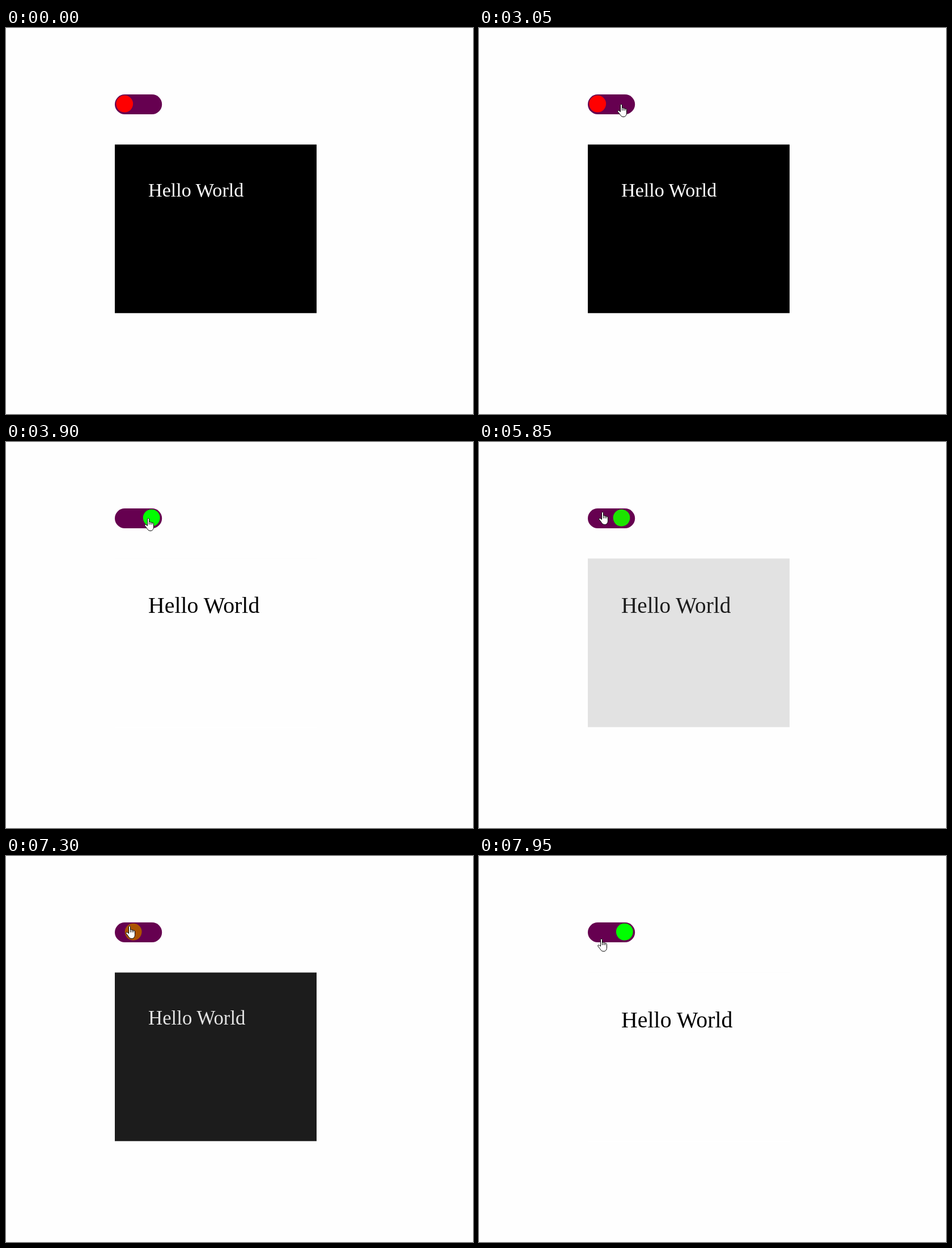
An HTML page that plays this animation: 824x680 px, repeating every 8000 ms.

```html
<!DOCTYPE html>
<html lang="en">
<head>
<meta charset="utf-8">
<title>Toggle switch</title>
<style>
  html, body { margin: 0; width: 100%; height: 100%; overflow: hidden; background: #fefefe; }
  svg { display: block; }
  text { font-family: "Liberation Serif", "Times New Roman", serif; }
  .cursor { fill: #fff; stroke: #000; stroke-linejoin: round; }
</style>
</head>
<body>
<svg width="824" height="680" viewBox="0 0 824 680">
  <rect x="192" y="117" width="83.2" height="35" rx="17.5" fill="#660050"/>
  <circle id="knob" cy="133.6" r="14.9"/>
  <rect id="panel" x="192" y="205.3" width="356" height="297"/>
  <text id="label" x="251">Hello World</text>
  <path id="arrow" class="cursor" d="M.5 .5V17L4.3 13.4L6.8 18.7L9.2 17.6L6.9 12.3H12Z"/>
  <path id="hand" class="cursor" d="M5.5 13.5V2C5.5 0 8.5 0 8.5 2V7.5C8.5 6 11.3 6 11.3 8C11.3 6.8 13.9 7 13.9 8.8C13.9 7.6 16.5 8 16.5 10V15.5C16.5 20 14 22.5 11 22.5C7.5 22.5 6 20.5 4.5 18L1 13.5C0 11.8 2 10.6 3.3 11.8ZM8.5 7.5V11.5M11.3 8V11.5M13.9 9V11.5"/>
</svg>
<script>
const LOOP = 8000, STEP = 50, DURATION = 300, WHITE = 254;
const [knob, panel, label, arrow, hand] =
  ['knob', 'panel', 'label', 'arrow', 'hand'].map(id => document.getElementById(id));

// Each click flips the switch; the knob may run ahead of the panel.
const clicks = [
  { panelAt: 3617, knobAt: 3617, knobTime: DURATION },
  { panelAt: 5817, knobAt: 5817, knobTime: DURATION },
  { panelAt: 7267, knobAt: 7250, knobTime: 235 },
];

// Pointer hot spot: time, x, y
const track = [
  [300, 46, -24], [350, 58, -8], [700, 290, 92], [900, 379, 205], [1100, 360, 277.5],
  [1150, 360, 277.5], [1250, 356, 308.5], [1600, 356, 308.5], [1800, 448, 390],
  [2000, 330, 447], [2200, 133, 350], [2320, 180, 250], [2450, 280, 210],
  [3050, 250, 134], [4750, 250, 134], [5100, 217, 123], [7800, 217, 123], [7950, 215, 145.5],
];

const mix = (a, b, p) => a + (b - a) * p;
const clamp = v => Math.min(1, Math.max(0, v));

// CSS "ease": cubic-bezier(.25, .1, .25, 1)
function ease(x) {
  if (x <= 0 || x >= 1) return clamp(x);
  const bezier = (a, b, s) => 3 * a * s * (1 - s) ** 2 + 3 * b * s * s * (1 - s) + s ** 3;
  let low = 0, high = 1;
  for (let i = 0; i < 24; i++) {
    const mid = (low + high) / 2;
    if (bezier(.25, .25, mid) < x) low = mid; else high = mid;
  }
  return bezier(.1, 1, low);
}

// 0 = off, 1 = on; alternate clicks add and subtract
const blend = (time, start, length) => clicks.reduce((sum, click, i) =>
  sum + (i % 2 ? -1 : 1) * ease((time - start(click)) / length(click)), 0);

function pointerAt(time) {
  const next = track.findIndex(point => point[0] > time);
  if (next < 0) return track.at(-1).slice(1);
  if (next === 0) return track[0].slice(1);
  const [t0, x0, y0] = track[next - 1], [t1, x1, y1] = track[next];
  const p = (time - t0) / (t1 - t0);
  return [mix(x0, x1, p), mix(y0, y1, p)];
}

function draw(time) {
  const knobOn = blend(time, c => c.knobAt, c => c.knobTime);
  const panelOn = blend(time, c => c.panelAt, () => DURATION);

  knob.setAttribute('cx', mix(209.2, 256.8, knobOn));
  knob.setAttribute('fill', `rgb(${mix(255, 0, knobOn)}, ${mix(0, 255, knobOn)}, 0)`);

  const gray = Math.round(WHITE * panelOn), ink = WHITE - gray;
  panel.setAttribute('fill', `rgb(${gray}, ${gray}, ${gray})`);
  label.setAttribute('fill', `rgb(${ink}, ${ink}, ${ink})`);
  label.setAttribute('font-size', mix(34.18, 39.87, panelOn));
  label.setAttribute('y', mix(296.5, 301.5, panelOn));

  const [x, y] = pointerAt(time);
  const overSwitch = x > 192 && x < 275 && y > 117 && y < 152;
  arrow.setAttribute('transform', `translate(${x} ${y})`);
  hand.setAttribute('transform', `translate(${x - 6} ${y})`);
  arrow.setAttribute('visibility', overSwitch ? 'hidden' : 'visible');
  hand.setAttribute('visibility', overSwitch ? 'visible' : 'hidden');
}

const began = performance.now();
function tick() {
  const time = (performance.now() - began) % LOOP;
  draw(Math.floor(time / STEP) * STEP);
  requestAnimationFrame(tick);
}
tick();
</script>
</body>
</html>
```
